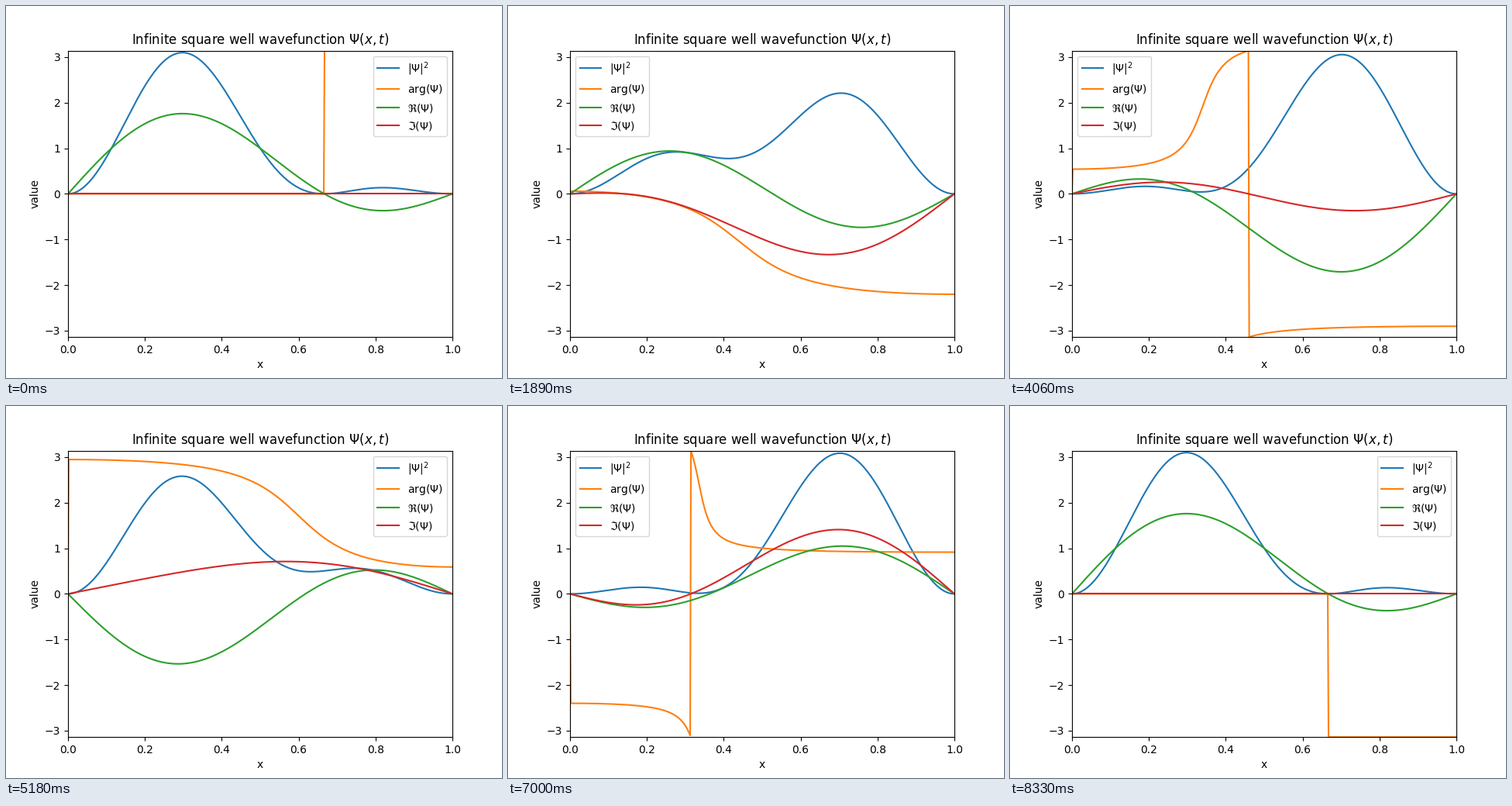
Write a matplotlib script that moves like this. It is 640 px wide and 480 px high and loops after 8400 ms.

```python
import numpy as np
import matplotlib.pyplot as plt
from matplotlib.animation import FuncAnimation

FRAMES = 120
INTERVAL = 70

x = np.linspace(0, 1, 500)
phases = np.linspace(0, 2 * np.pi, FRAMES)


def psi(theta):
    """Equal mix of the two lowest states; energies scale as n squared."""
    return sum(np.sin(n * np.pi * x) * np.exp(-1j * n**2 * theta)
               for n in (1, 2))


PARTS = [
    (r"$|\Psi|^2$", lambda p: np.abs(p) ** 2),
    (r"$\arg(\Psi)$", np.angle),
    (r"$\Re(\Psi)$", np.real),
    (r"$\Im(\Psi)$", np.imag),
]

fig, ax = plt.subplots(figsize=(6.4, 4.8), dpi=100)
start = psi(phases[0])
lines = [ax.plot(x, part(start), label=label)[0] for label, part in PARTS]
ax.set_xlim(0, 1)
ax.set_ylim(-np.pi, np.pi)
ax.set_xlabel("x")
ax.set_ylabel("value")
ax.set_title(r"Infinite square well wavefunction $\Psi(x,t)$")
# The "best" location is found anew on every draw.
ax.legend(loc="best")


def update(i):
    p = psi(phases[i])
    for line, (_, part) in zip(lines, PARTS):
        line.set_ydata(part(p))
    return lines


anim = FuncAnimation(fig, update, frames=FRAMES, interval=INTERVAL,
                     repeat=True, repeat_delay=0, blit=False)
plt.show()
```
